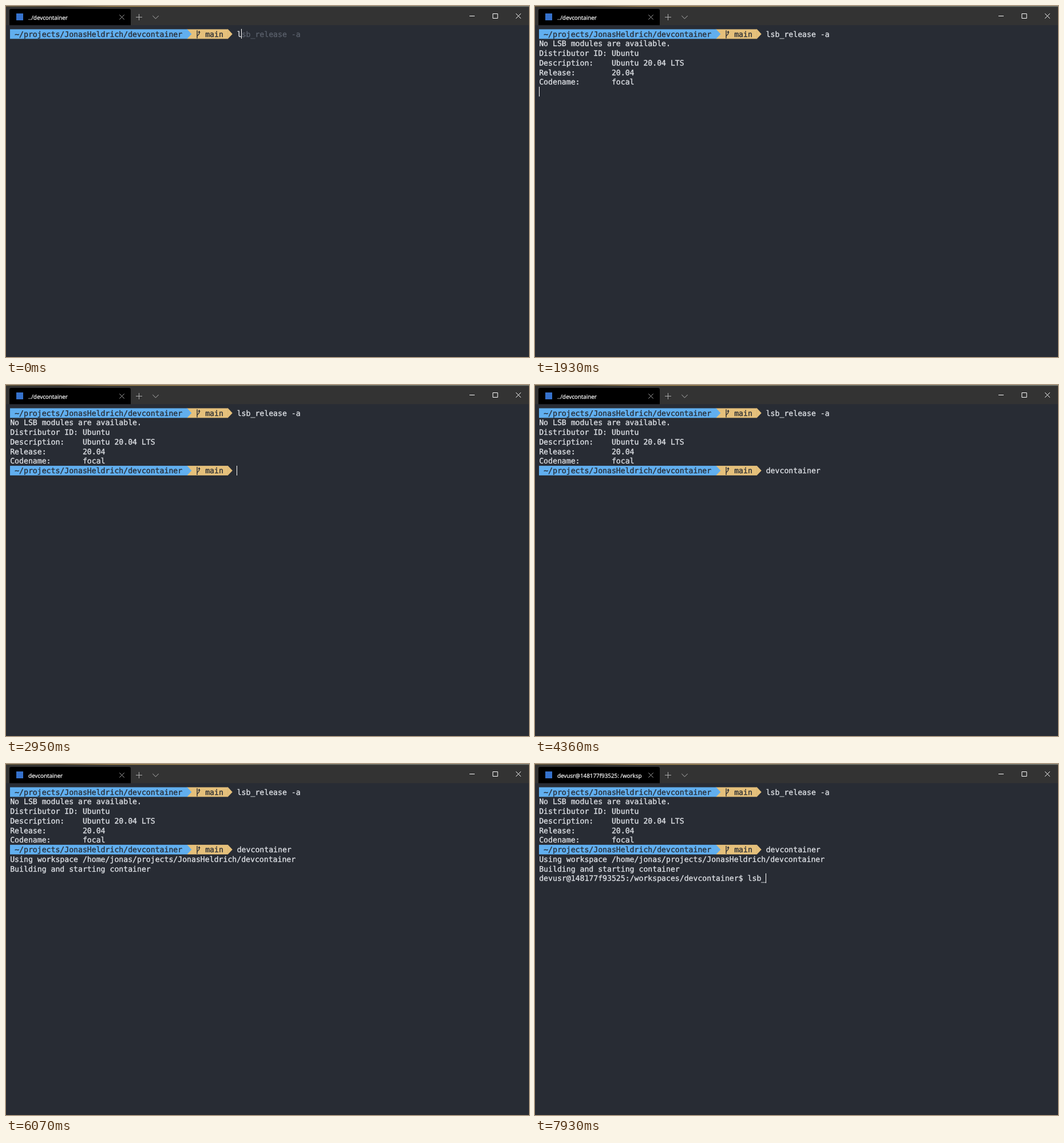
An HTML page with a canvas for the animation above (8000 ms loop, 914 by 613 pixels).

```html
<!DOCTYPE html>
<html lang="en">
<head>
<meta charset="utf-8">
<title>Terminal session</title>
<style>
  html, body { margin: 0; width: 100%; height: 100%; overflow: hidden; background: #282c34; }
  canvas { display: block; }
</style>
</head>
<body>
<canvas id="stage" width="914" height="613"></canvas>
<script>
const ctx = document.getElementById('stage').getContext('2d');
const LOOP = 8000;
const CELL = 7.93, LEFT = 7.2, TOP = 40.6, ROW = 16.75;
const BG = '#282c34', FG = '#dcdfe4', GHOST = '#5a606b';
const BLUE = '#61afef', YELLOW = '#e5c07b';
const MONO = '13.172px "DejaVu Sans Mono", monospace';
const UI = '9.85px "Open Sans", sans-serif';

const USER = 'JonasHeldrich';
const PATH = `~/projects/${USER}/devcontainer`;
const SHELL = 'devusr@148177f93525:/workspaces/devcontainer$ ';
const REPORT = [
  'No LSB modules are available.',
  'Distributor ID: Ubuntu',
  'Description:    Ubuntu 20.04 LTS',
  'Release:        20.04',
  'Codename:       focal'
];
const CMD_COL = 50;

const colX = c => LEFT + c * CELL;
const rowY = r => TOP + r * ROW;

// Last entry of a [time, value] list that has started
function at(list, t) {
  let value = list[0][1];
  for (const [start, v] of list) if (t >= start) value = v;
  return value;
}

function rect(x, y, w, h, color) {
  ctx.fillStyle = color;
  ctx.fillRect(x, y, w, h);
}

function poly(points, color) {
  ctx.fillStyle = color;
  ctx.beginPath();
  points.forEach(([x, y]) => ctx.lineTo(x, y));
  ctx.fill();
}

function line(points, color, width = 1) {
  ctx.strokeStyle = color;
  ctx.lineWidth = width;
  ctx.beginPath();
  points.forEach(([x, y], i) => i ? ctx.lineTo(x, y) : ctx.moveTo(x, y));
  ctx.stroke();
}

function cross(x, y, r, color) {
  line([[x - r, y - r], [x + r, y + r]], color);
  line([[x - r, y + r], [x + r, y - r]], color);
}

// Text with a hairline outline for a semi-bold weight
function label(text, x, y, font, color, weight) {
  ctx.font = font;
  ctx.fillStyle = ctx.strokeStyle = color;
  ctx.lineWidth = weight;
  ctx.lineJoin = 'round';
  ctx.fillText(text, x, y);
  ctx.strokeText(text, x, y);
}

function write(text, col, row, color = FG) {
  label(text, colX(col), rowY(row) + 13, MONO, color, 0.35);
}

function cursor(col, row) {
  rect(Math.floor(colX(col)), Math.floor(rowY(row)), 1, 17, '#ffffff');
}

function arrow(col, y, color) {
  const x = colX(col);
  poly([[x - 0.5, y], [x, y], [x + CELL, y + ROW / 2], [x, y + ROW], [x - 0.5, y + ROW]], color);
}

function branch(x, y) {
  line([[x + 1.7, y + 2], [x + 1.7, y + 16]], BG, 1.4);
  line([[x + 5.3, y + 5], [x + 5.3, y + 8], [x + 1.7, y + 12]], BG, 1.3);
  poly([[x + 3.2, y + 6], [x + 5.3, y + 2.5], [x + 7.4, y + 6]], BG);
}

function prompt(row) {
  const y = rowY(row);
  rect(colX(39), y, CELL * 9, ROW, YELLOW);
  rect(7, y, colX(39) - 7, ROW, BLUE);
  arrow(39, y, BLUE);
  arrow(48, y, YELLOW);
  write(PATH, 1, row, BG);
  branch(colX(41), y);
  write('main', 43, row, BG);
}

function command(full, typed, row) {
  write(full.slice(0, typed), CMD_COL, row);
  if (typed && typed < full.length) write(full.slice(typed), CMD_COL + typed, row, GHOST);
}

function titleBar(t) {
  rect(0, 0, 914, 33.5, '#333333');
  const edge = ctx.createLinearGradient(0, 0, 914, 0);
  [[0, '#6e6040'], [0.1, '#5c4e32'], [0.2, '#a98a4e'], [0.36, '#a98f5c'],
   [0.5, '#777a6c'], [1, '#7c837b']].forEach(([p, c]) => edge.addColorStop(p, c));
  rect(0, 0, 914, 1.3, edge);

  ctx.fillStyle = '#000000';
  ctx.beginPath();
  ctx.roundRect(6, 5, 212, 28.5, [3, 3, 0, 0]);
  ctx.fill();
  rect(18, 13, 12, 12, '#3672cc');

  ctx.save();
  ctx.beginPath();
  ctx.rect(38, 8, 149, 24);
  ctx.clip();
  label(at(titles, t), 39, 24, UI, '#ffffff', 0.25);
  ctx.restore();

  cross(202.5, 19.5, 4.2, '#a8a8a8');
  line([[227, 19.5], [238, 19.5]], '#adadad');
  line([[232.5, 14], [232.5, 25]], '#adadad');
  line([[256.3, 17], [261.5, 22.2], [266.7, 17]], '#b4b4b4');
  line([[810, 17.5], [819, 17.5]], '#ffffff');
  ctx.strokeRect(850.9, 13.5, 8.3, 8);
  cross(895.5, 17.5, 4.3, '#ffffff');
}

const titles = [
  [0, '../devcontainer'],
  [4500, 'devcontainer'],
  [6680, 'devusr@148177f93525: /workspaces/devcontainer']
];
const typedFirst = [[0, 1], [1130, 14]];
const typedSecond = [[0, 0], [3350, 1], [3410, 2], [3670, 3], [3850, 12]];
const typedThird = [[0, 0], [7380, 1], [7460, 2], [7620, 3], [7930, 4]];

// Cursor cell as [column, row], or null while blinked off
const cursors = [
  [0, [51, 0]], [500, null], [1070, [51, 0]], [1130, [64, 0]], [1660, null],
  [1930, [0, 6]], [1990, [50, 6]], [2440, null], [2950, [50, 6]],
  [3350, [51, 6]], [3410, [52, 6]], [3670, [53, 6]], [3850, [62, 6]], [4360, null],
  [4500, [0, 8]], [4660, [0, 9]], [5010, null], [5520, [0, 9]], [6070, null],
  [6680, [46, 9]], [7190, null],
  [7380, [47, 9]], [7460, [48, 9]], [7620, [49, 9]], [7930, [50, 9]]
];

function draw(t) {
  rect(0, 0, 914, 613, BG);
  titleBar(t);

  prompt(0);
  command('lsb_release -a', at(typedFirst, t), 0);
  if (t >= 1930) REPORT.forEach((text, i) => write(text, 0, i + 1));
  if (t >= 1990) {
    prompt(6);
    command('devcontainer', at(typedSecond, t), 6);
  }
  if (t >= 4500) write(`Using workspace /home/jonas/projects/${USER}/devcontainer`, 0, 7);
  if (t >= 4660) write('Building and starting container', 0, 8);
  if (t >= 6680) write(SHELL + 'lsb_'.slice(0, at(typedThird, t)), 0, 9);

  const cell = at(cursors, t);
  if (cell) cursor(...cell);
}

ctx.textRendering = 'geometricPrecision';
const begin = performance.now();
function tick() {
  draw((performance.now() - begin) % LOOP);
  requestAnimationFrame(tick);
}
tick();
</script>
</body>
</html>
```
